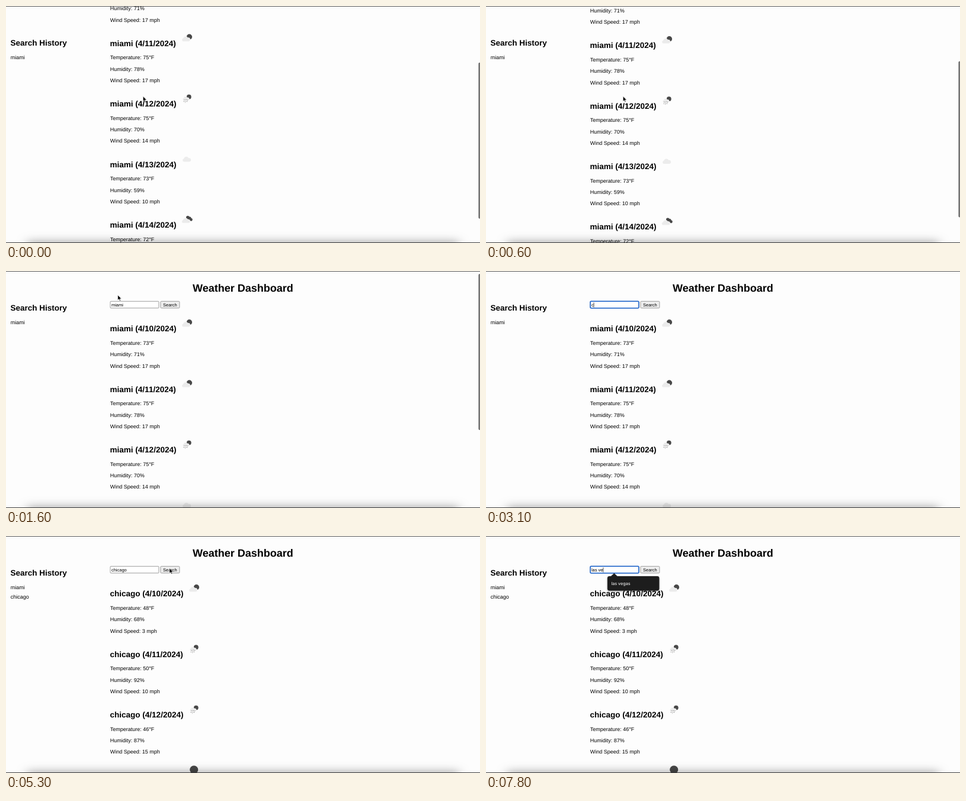
Recreate the animation shown at these times as an HTML page. Size 800x401 px, loop 8 s.

```html
<!DOCTYPE html>
<html lang="en">
<head>
<meta charset="utf-8">
<title>Weather Dashboard</title>
<style>
  html, body { margin: 0; width: 100%; height: 100%; overflow: hidden; background: #fdfdfd; }
  #stage { position: absolute; inset: 0; overflow: hidden; }
  svg { position: absolute; left: 0; top: 0; width: 800px; height: 401px; }
  text { font: 9px "Liberation Sans", Arial, sans-serif; white-space: pre; text-rendering: geometricPrecision; }
  .h1 { font-size: 18px; font-weight: 700; text-anchor: middle; }
  .h2 { font-size: 13.5px; font-weight: 700; }
  .ctl { font-size: 7.5px; }
  .menu text { font: 600 7.2px Inter, Roboto, sans-serif; fill: #e6e6e6; }
  .menu .mid { font-weight: 500; }
  .menu { filter: drop-shadow(0 1px 1.5px rgba(0, 0, 0, .4)); }
  .dock { position: absolute; left: 36px; right: 36px; top: 402px; height: 30px; box-shadow: 0 0 18px rgba(0, 0, 0, .5); }
  .edge { position: absolute; left: 0; right: 0; height: 1px; }
</style>
</head>
<body>
<div id="stage">
  <svg viewBox="0 0 800 401">
    <defs>
      <path id="cloud" d="M2.8 9.4A2.7 2.7 0 0 1 2.9 4.2A4.4 4.4 0 0 1 11 3.2A3.2 3.2 0 0 1 12.6 9.4Z"/>
      <g id="moon"><circle cx="14" cy="14" r="7" fill="#484848"/></g>
      <g id="few">
        <circle cx="18.2" cy="12.6" r="4.7" fill="#484848"/>
        <use href="#cloud" x="4.8" y="10.8" fill="#ebebeb" stroke="#fdfdfd" stroke-width=".5"/>
      </g>
      <g id="scattered"><use href="#cloud" x="6" y="9.6" fill="#ececec"/></g>
      <g id="broken">
        <g fill="#484848"><circle cx="15.6" cy="11" r="2.8"/><circle cx="18.6" cy="12.6" r="2.9"/><circle cx="21.2" cy="14.6" r="2.4"/></g>
        <use href="#cloud" x="4.6" y="11" fill="#ebebeb" stroke="#fdfdfd" stroke-width=".5"/>
      </g>
      <g id="rain">
        <circle cx="17.6" cy="11.6" r="3.9" fill="#484848"/>
        <use href="#cloud" transform="translate(6.4 10.4) scale(.78)" fill="#ebebeb" stroke="#fdfdfd" stroke-width=".5"/>
        <path d="M10 16.4l-.5 1M13 16l-.5 1M15.5 16.6l-.5 1M9.4 19l-.5 1M12.2 18.6l-.5 1M14.6 19l-.5 1M11.6 20.7l-.3.6" stroke="#484848" stroke-width=".9"/>
      </g>
    </defs>

    <text class="h2" x="7.5" y="67.3">Search History</text>
    <text x="7.7" y="89.8">miami</text>
    <text id="recent" x="7.7" y="105.9">chicago</text>

    <g id="page">
      <text class="h1" x="399.9" y="34.9">Weather Dashboard</text>
      <rect x="176" y="51.3" width="81.9" height="11.4" rx="1" fill="#fff" stroke="#767676" stroke-width=".7"/>
      <rect id="ring" x="176" y="51.3" width="81.9" height="11.4" rx="1.2" fill="none" stroke="#1660cc" stroke-width="1.5"/>
      <rect id="mark" y="53" height="8.6" fill="#b0d3fb"/>
      <text id="field" class="ctl" x="177.9" y="59.6"></text>
      <rect id="caret" y="53.2" width=".7" height="8.2"/>
      <rect x="260.9" y="51.3" width="32" height="11.4" rx="1.4" fill="#efefef" stroke="#767676" stroke-width=".7"/>
      <text class="ctl" x="276.9" y="59.6" text-anchor="middle">Search</text>
      <g id="miami"></g>
      <g id="chicago"></g>
    </g>

    <g class="menu" id="menuTwo">
      <path d="M210.5 68.6L216.3 63L222 68.6Z" fill="#1d1d1d"/>
      <rect x="204.9" y="68" width="87.5" height="44.6" rx="3.4" fill="#1d1d1d"/>
      <text x="211.4" y="82.6">chicago</text>
      <text x="211.4" y="102.8">chicago illinois</text>
    </g>
    <g class="menu" id="menuOne">
      <path d="M210.5 68.6L216.3 63L222 68.6Z" fill="#1d1d1d"/>
      <rect x="204.9" y="68" width="87.5" height="24.5" rx="3.4" fill="#1d1d1d"/>
      <text class="mid" x="211.4" y="82.6">las vegas</text>
    </g>

    <rect id="thumb" x="797.4" width="4" height="264" rx="2" fill="#747474"/>
  </svg>

  <div class="dock"></div>
  <div class="edge" style="top:0;background:#5a5a5a"></div>
  <div class="edge" style="bottom:0;background:#3c3c3c"></div>

  <svg viewBox="0 0 800 401">
    <path id="arrow" d="M0 0V8.6L2 6.8L3.3 9.8L4.7 9.2L3.4 6.3H6.1Z" fill="#000" stroke="#fff" stroke-width=".6"/>
    <g id="beam" fill="none">
      <path d="M-2 -4.6Q0 -4.6 0 -3.4Q0 -4.6 2 -4.6M0 -3.6V3.6M-2 4.6Q0 4.6 0 3.4Q0 4.6 2 4.6M-1 1.4H1" stroke="#fff" stroke-width="1.6"/>
      <path d="M-2 -4.6Q0 -4.6 0 -3.4Q0 -4.6 2 -4.6M0 -3.6V3.6M-2 4.6Q0 4.6 0 3.4Q0 4.6 2 4.6M-1 1.4H1" stroke="#111" stroke-width=".8"/>
    </g>
  </svg>
</div>

<script>
const LOOP = 8000, STEP = 100;
const $ = id => document.getElementById(id);
const pen = document.createElement('canvas').getContext('2d');
pen.font = '75px "Liberation Sans", Arial, sans-serif';
const widthOf = s => pen.measureText(s).width / 10;

// icon, temperature, humidity, wind
const forecast = {
  miami: [['few', 73, 71, 17], ['few', 75, 78, 17], ['rain', 75, 70, 14], ['scattered', 73, 59, 10], ['broken', 72]],
  chicago: [['few', 48, 68, 3], ['rain', 50, 92, 10], ['rain', 46, 87, 15], ['moon']]
};
const lines = [v => `Temperature: ${v}°F`, v => `Humidity: ${v}%`, v => `Wind Speed: ${v} mph`];

function buildCards(city, iconX) {
  $(city).innerHTML = forecast[city].map(([icon, ...values], i) => {
    const y = 102.3 + i * 102.4;
    const rows = values.map((v, k) => `<text x="175.7" y="${y + 22.6 + k * 19.35}">${lines[k](v)}</text>`);
    return `<text class="h2" x="175.6" y="${y}">${city} (4/${10 + i}/2024)</text>` +
      `<use href="#${icon}" x="${iconX}" y="${y - 28.1}"/>` + rows.join('');
  }).join('');
}
buildCards('miami', 291.2);
buildCards('chicago', 303.2);

const scrollKeys = [[0, 136.9], [600, 133.4], [700, 118], [800, 93], [900, 63], [1000, 35.3], [1100, 12], [1200, 2], [1300, 0]];
const mouseKeys = [
  [0, 231.3, 152.8], [1200, 231.3, 152.8], [1600, 188.7, 40.7], [1800, 204, 57], [2000, 204, 57], [2400, 180, 57.5],
  [4400, 216, 57.5], [4500, 220, 57], [4700, 257, 52], [4900, 276, 55], [5700, 276, 54], [6100, 216, 58]
];
const typed = [
  [0, 'miami'], [3100, 'c'], [3200, 'ch'], [3300, 'chi'], [3600, 'chic'], [3700, 'chica'], [3900, 'chicag'], [4200, 'chicago'],
  [6700, 'l'], [6900, 'la'], [7100, 'las'], [7300, 'las '], [7500, 'las v'], [7700, 'las ve']
];

function track(keys, t, k = 1) {
  const i = keys.findIndex(key => key[0] > t);
  if (i < 0) return keys[keys.length - 1][k];
  const a = keys[i - 1], b = keys[i];
  return a[k] + (b[k] - a[k]) * (t - a[0]) / (b[0] - a[0]);
}
const within = (t, a, b) => t >= a && t < b;
const show = (id, on) => { $(id).style.display = on ? '' : 'none'; };

function render(t) {
  const scroll = track(scrollKeys, t);
  $('page').setAttribute('transform', `translate(0 ${-scroll})`);
  $('thumb').setAttribute('y', 5 + scroll * .663);
  $('thumb').style.opacity = Math.max(0, Math.min(1, (1800 - t) / 200));

  const searched = t >= 5200;
  show('miami', !searched);
  show('chicago', searched);
  show('recent', searched);
  show('ring', within(t, 2000, 5000) || t >= 6100);
  show('menuTwo', within(t, 3200, 5000) || within(t, 6100, 6700));
  show('menuOne', t >= 6700);

  const text = typed.filter(k => k[0] <= t).pop()[1];
  const end = 177.9 + widthOf(text);
  $('field').textContent = text;
  $('caret').setAttribute('x', end);
  show('caret', within(t, 3100, 4500) || t >= 6700);

  const mx = track(mouseKeys, t), my = track(mouseKeys, t, 2);
  const dragging = within(t, 2100, 3100);
  const from = dragging ? Math.min(end, Math.max(177.9, mx - 2.1)) : 177.9;
  $('mark').setAttribute('x', from);
  $('mark').setAttribute('width', end - from);
  show('mark', dragging || within(t, 6200, 6700));

  const visible = !within(t, 3100, 4500) && t < 6700;
  const overField = mx < 258 && my > 48 && my < 65;
  for (const id of ['arrow', 'beam']) {
    $(id).setAttribute('transform', `translate(${mx} ${my})`);
    show(id, visible && overField === (id === 'beam'));
  }
}

const start = performance.now();
function frame() {
  const t = (performance.now() - start) % LOOP;
  render(Math.floor(t / STEP) * STEP);
  requestAnimationFrame(frame);
}
frame();
</script>
</body>
</html>
```
